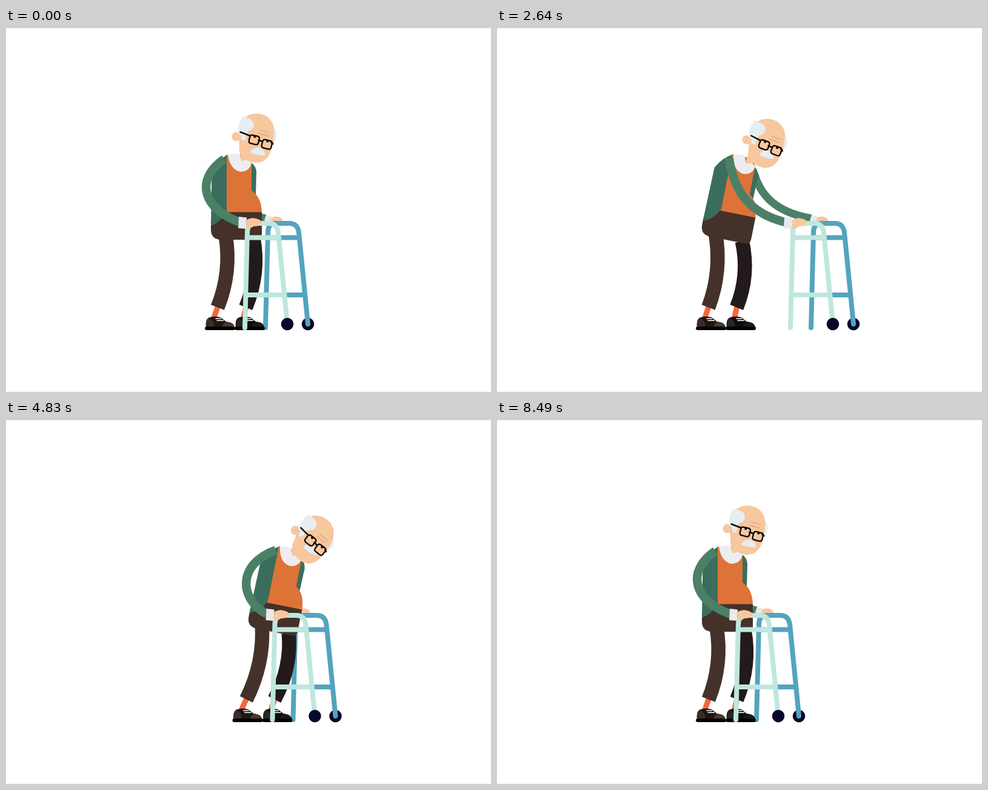
These frames come from a looping animation (800 px wide and 600 px high, 8520 ms). An HTML page with a canvas:

```html
<!DOCTYPE html>
<html lang="en">
<head>
<meta charset="utf-8">
<title>Old man with a walker</title>
<style>
html, body { margin: 0; width: 100%; height: 100%; overflow: hidden; background: #fff; }
canvas { display: block; width: 800px; height: 600px; }
</style>
</head>
<body>
<canvas id="stage" width="800" height="600"></canvas>
<script>
const ctx = document.getElementById('stage').getContext('2d');
const LOOP = 8520, STEP = 30;

const C = {
  skin: '#f7c79e', hair: '#e5eef1', line: '#dda781', ink: '#0a0808',
  vest: '#3b6d5c', sleeve: '#4b8067', shirt: '#de7338', collar: '#ededef', cuff: '#e9e8ee',
  pants: '#443129', farPants: '#231a1b', sock: '#f4663f',
  near: '#bee7de', far: '#54a4bd', wheel: '#08082a'
};

const part = (t, a, b) => Math.max(0, Math.min(1, (t - a) / (b - a)));
const ease = p => 0.5 - 0.5 * Math.cos(Math.PI * p);

// Every joint is a sum of eased moves and there-and-back bumps
function pose(t) {
  const move = (a, b) => ease(part(t, a, b));
  const bump = (a, b) => Math.sin(Math.PI * part(t, a, b)) ** 2;
  const slide = 1 - part(t, 4380, 5290);
  const step = a => {
    const p = part(t, a, a + 840);
    return { x: 90 * ease(p) * slide, up: 11.5 * Math.sin(Math.PI * p) };
  };
  const reach = move(0, 1100);
  const back = move(6960, 7470) - move(7800, 8490);
  const nod = 6 * reach + 18 * move(3000, 5000) - 24 * move(6100, 7200) - 13 * back;
  return {
    push: 90 * move(0, 900) * slide,
    near: step(2640),
    far: step(3480),
    hip: [
      380 - 2 * reach - 1.5 * bump(1320, 2640) + 62 * move(2640, 4480) - 60 * move(5600, 6960),
      340 - 1.5 * reach + 1.5 * move(1320, 2640) - 4 * bump(2900, 4080)
    ],
    lean: 11.3 * reach - 7.3 * bump(3000, 4750) + 5 * bump(4850, 6700) - 11.3 * move(5900, 6960),
    nod,
    crane: [
      0.3 * nod + 9 * bump(4850, 6960) - 7 * back,
      1.5 * (reach - move(6960, 7470)) - 2 * back
    ],
    lip: 6 * (move(1500, 3500) - move(4900, 6000))
  };
}

function spin(x, y, deg, [px, py]) {
  const r = deg * Math.PI / 180, c = Math.cos(r), s = Math.sin(r);
  return [px + x * c - y * s, py + x * s + y * c];
}
function fill(d, color) {
  ctx.fillStyle = color;
  ctx.fill(new Path2D(d));
}
function stroke(d, color, width, cap = 'butt') {
  ctx.strokeStyle = color;
  ctx.lineWidth = width;
  ctx.lineCap = cap;
  ctx.lineJoin = 'round';
  ctx.stroke(new Path2D(d));
}
function disc(x, y, r, color) {
  ctx.fillStyle = color;
  ctx.beginPath();
  ctx.arc(x, y, r, 0, 2 * Math.PI);
  ctx.fill();
}
function group(x, y, deg, ox, oy, draw) {
  ctx.save();
  ctx.translate(x, y);
  ctx.rotate(deg * Math.PI / 180);
  ctx.translate(-ox, -oy);
  draw();
  ctx.restore();
}
const shift = (x, y, draw) => group(x, y, 0, 0, 0, draw);

function frame(color) {
  stroke('M394 494 L398 337 Q398 322 411 322 H433 Q447 322 449 337 L464 488', color, 8, 'round');
  stroke('M398 345.5 H450 M396 440 H459', color, 8);
}
function nearWalker() {
  frame(C.near);
  disc(464, 488, 10.3, C.wheel);
}
function farWalker() {
  disc(498, 488, 10.3, C.wheel);
  shift(34, 0, () => frame(C.far));
}

function shoe(main, heel, toe) {
  fill('M330 493 C329 484 331 478 336 477 Q345 474 354 477 L363 484 Q376 485 377 493 Z', main);
  fill('M330 493 C329 484 331 479 335 478 Q344 483 344 493 Z', heel);
  fill('M357 493 Q358 485 365 484.5 Q376 486 376 493 Z', toe);
  stroke('M346 479 H354.5 M348 482.2 H358.5', '#fff', 1.6, 'round');
  stroke('M331 495 H375', '#050404', 6, 'round');
}

// Leg from hip joint to shoe; gap is the shoe's place beside the near one
function leg([x, y], foot, gap, hipX, color, shoeColors) {
  const ex = 349 + gap * 0.95 + foot.x + (hipX - 380 - foot.x) * 0.13 + foot.up * 0.2;
  const ey = 460.5 - foot.up * 0.8;
  stroke(`M${ex + 1} ${ey - 3} L${342 + gap + foot.x} ${480 - foot.up}`, C.sock, 9);
  shift(gap + foot.x, -foot.up, () => shoe(...shoeColors));
  stroke(`M${x} ${y} Q${(x + ex) / 2 + 17} ${(y + ey) / 2 + 1} ${ex} ${ey}`, color, 23.5);
}

function torso() {
  fill('M361 303 H422 V340 Q422 349 413 349 H354 Q338 348 338 332 V318 Z', C.pants);
  fill('M403 221 Q412 226 413 237 L412 276 L403 268 Z', C.vest);
  fill('M363 209 H398 L405 221 V268 Q421 278 422 303.5 H361 Z', C.shirt);
  fill('M366 208.5 Q350 216 339.5 236 L338 326 Q355 320 364 301 V209 Z', C.vest);
  fill('M366 209 Q376 205 385 208 L389 219 L398 216 L405 221 Q403 236 387 237 Q370 234 366 209 Z', C.collar);
}

function head(lip) {
  fill('M438 164 Q447 167 447 178 Q445 189 437 192 Z', C.hair);
  disc(380, 179, 7.6, C.skin);
  fill('M384 172 C384 152 397 141 413 141 C430 141 442.5 153 442.5 170 C442.5 180 440 194 437 202 C432 217 424 222 411 222 C396 220 387 212 385 203 Z', C.skin);
  fill('M390.5 145.5 L400 149 Q409 152 409 161 Q408 168 399 170 L396 179 L394 185.5 L388 184.5 L388 177 L382 173 Q382 158 390.5 145.5 Z', C.hair);
  stroke('M419 168 L436 173 M416 173.5 L434 178.5', C.line, 1.3);
  shift(0, -lip, () => fill('M403 205.5 C407 194 425 193 427.5 209.5 Q416 210.5 403 205.5 Z', C.hair));
  for (const x of [409.3, 430.3]) {
    const y = 184.3 + (x - 409.3) * 0.36;
    disc(x + 1, y - 5, 2, C.ink);
    group(x, y, 14, 0, 0, () => stroke('M-4 -7 H4 Q8 -7 8 -3 V3 Q8 7 4 7 H-4 Q-8 7 -8 3 V-3 Q-8 -7 -4 -7 Z', C.ink, 2.3));
  }
  stroke('M386.5 171.5 L402 177.5 M416.5 185 L422.5 187 M437.5 188.5 L440.5 191', C.ink, 2.5, 'round');
}

function farArm([x, y], push) {
  const wx = 428 + push;
  const cx = x + 0.3 * (wx - x) - 15;
  stroke(`M${x} ${y} C${cx} ${y + 46} ${wx - 45} 306 ${wx} 314`, C.sleeve, 13);
  shift(push, 0, () => {
    fill('M429 308.5 L439 311 L437 320 L426 317 Z', C.cuff);
    fill('M437 313 Q444 308.5 452 312 Q457 315 456 321 H437 Z', C.skin);
  });
}

// The elbow folds back as the wrist comes closer to the shoulder
function nearArm([x, y], push) {
  const wx = 385 + push, wy = 320, d = wx - x;
  const c1 = [x - 60 + 0.3 * d + 0.0047 * d * d, y + 27 + 0.28 * d];
  const c2 = [wx + Math.max(-60, -54 - 0.5 * d), wy - 24 + 0.1 * d];
  stroke(`M${x} ${y} C${c1} ${c2} ${wx} ${wy}`, C.sleeve, 14.5);
  shift(push, 0, () => {
    fill('M397 316 Q405 312 412 314 Q422 316 421 321 Q419 327 408 327 Q403 331 396 330 Z', C.skin);
    fill('M384 311 L397 312.5 L396 331 L383 330 Z', C.cuff);
  });
}

function draw(t) {
  const { push, near, far, hip, lean, nod, crane, lip } = pose(t);
  const onBody = (x, y) => spin(x - 380, y - 340, lean, hip);
  const temple = onBody(386, 171).map((v, i) => v + crane[i]);
  const onHead = (x, y) => spin(x - 386, y - 171, nod, temple);

  ctx.fillStyle = '#f0f0f0';
  ctx.fillRect(0, 0, 800, 600);
  ctx.fillStyle = '#fff';
  ctx.fillRect(0, 1, 800, 598);

  farArm(onBody(406, 233), push);
  shift(push, 0, farWalker);
  leg(onBody(408, 346), far, 49, hip[0], C.farPants, ['#0e0d0d', '#272626', '#1b1919']);
  leg(onBody(362, 341), near, 0, hip[0], C.pants, ['#1d1613', '#3b2d27', '#4a3830']);

  group(...hip, lean, 380, 340, torso);
  const neck = [onHead(385, 186), onHead(385, 202), onBody(388, 219), onBody(395, 217), onHead(408, 216)];
  fill('M' + neck.join(' L') + ' Z', C.skin);
  group(...temple, nod, 386, 171, () => head(lip));

  shift(push, 0, nearWalker);
  nearArm(onBody(360, 216), push);
}

function tick(now) {
  draw(Math.floor((now % LOOP) / STEP) * STEP);
  requestAnimationFrame(tick);
}
draw(0);
requestAnimationFrame(tick);
</script>
</body>
</html>
```
